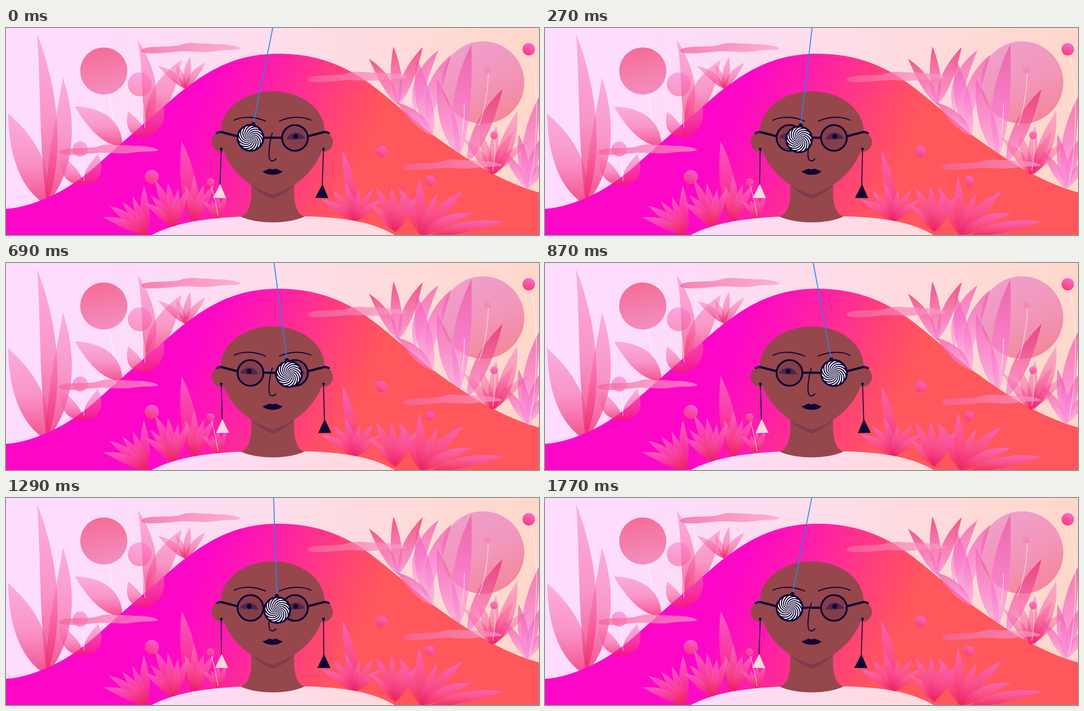
These frames come from a looping animation (1199 px wide and 467 px high, 1800 ms). An HTML page:

```html
<!DOCTYPE html>
<html lang="en">
<head>
<meta charset="utf-8">
<title>Pendulum</title>
<style>
html, body { margin: 0; width: 100%; height: 100%; overflow: hidden; }
svg { display: block; width: 100%; height: 100%; }
.line { fill: none; stroke: #100435; stroke-linecap: round; stroke-linejoin: round; }
.stem { fill: none; stroke: #fff; stroke-opacity: .6; stroke-width: 1.6; }
.ink { fill: #100435; }
.skin { fill: #95474c; }
</style>
</head>
<body>
<svg viewBox="0 0 1199 467" preserveAspectRatio="xMidYMid slice">
  <defs>
    <linearGradient id="sky" gradientUnits="userSpaceOnUse" x1="150" y1="180" x2="1150" y2="260">
      <stop offset="0" stop-color="#fddcff"/><stop offset=".5" stop-color="#fddde8"/><stop offset="1" stop-color="#ffd8cc"/>
    </linearGradient>
    <linearGradient id="hill" gradientUnits="userSpaceOnUse" x1="420" y1="190" x2="780" y2="345">
      <stop offset="0" stop-color="#fc06c8"/><stop offset=".35" stop-color="#fd20a6"/><stop offset=".75" stop-color="#ff4376"/><stop offset="1" stop-color="#ff575c"/>
    </linearGradient>
    <linearGradient id="shirt">
      <stop offset="0" stop-color="#fddcfb"/><stop offset="1" stop-color="#ffdbdc"/>
    </linearGradient>
    <linearGradient id="cloud">
      <stop offset="0" stop-color="#f4649a" stop-opacity=".75"/><stop offset="1" stop-color="#fc9ccb" stop-opacity=".7"/>
    </linearGradient>
    <linearGradient id="ball" x1=".7" y1="0" x2=".3" y2="1">
      <stop offset="0" stop-color="#fb6cd6"/><stop offset="1" stop-color="#f53c70"/>
    </linearGradient>
    <linearGradient id="sun" x1=".4" y1="0" x2=".6" y2="1">
      <stop offset="0" stop-color="#f66c96"/><stop offset="1" stop-color="#f28fc0"/>
    </linearGradient>
    <linearGradient id="moon" x1=".3" y1="0" x2=".75" y2="1">
      <stop offset="0" stop-color="#ee98cc"/><stop offset=".5" stop-color="#f090b8"/><stop offset="1" stop-color="#f27c92"/>
    </linearGradient>
    <linearGradient id="soft" x2="0" y2="1">
      <stop offset="0" stop-color="#f887c4" stop-opacity=".55"/><stop offset=".5" stop-color="#f65c9c" stop-opacity=".55"/><stop offset="1" stop-color="#f01c66" stop-opacity=".75"/>
    </linearGradient>
    <linearGradient id="warm" x2="0" y2="1">
      <stop offset="0" stop-color="#ea2c68" stop-opacity=".75"/><stop offset="1" stop-color="#fa80d4" stop-opacity=".65"/>
    </linearGradient>
    <linearGradient id="lilac" x2="0" y2="1">
      <stop offset="0" stop-color="#ec4c98" stop-opacity=".65"/><stop offset=".5" stop-color="#f872cc" stop-opacity=".7"/><stop offset="1" stop-color="#fa94dc" stop-opacity=".5"/>
    </linearGradient>
    <linearGradient id="front" x2="0" y2="1">
      <stop offset="0" stop-color="#fb6cc6" stop-opacity=".8"/><stop offset=".5" stop-color="#f84c98" stop-opacity=".7"/><stop offset="1" stop-color="#ea1c5a" stop-opacity=".7"/>
    </linearGradient>
    <path id="puff" d="M0 17C10 5 68 12 88 5 98 1 110 0 122 1 140 3 150 1 168 4 190 2 222 9 223 13 222 18 196 15 168 19 140 24 112 18 84 20 52 23 36 25 14 24 4 23 0 21 0 17Z"/>
  </defs>
  <rect width="1199" height="467" fill="url(#sky)"/>
  <circle cx="220" cy="97" r="53" fill="url(#sun)"/>
  <circle cx="1073" cy="123" r="93" fill="url(#moon)" opacity=".9"/>
  <g id="back"></g>
  <path fill="url(#hill)" d="M0 408C70 403 148 360 198 315 256 263 308 217 344 187 428 110 500 58 613 58 730 58 800 109 850 150 890 183 925 213 960 241 1040 299 1110 345 1199 371V467H0Z"/>
  <g id="mid"></g>
  <g id="fore"></g>
  <g fill="url(#cloud)">
    <use href="#puff" x="304" y="33"/><use href="#puff" x="119" y="262"/>
    <use href="#puff" x="678" y="98"/><use href="#puff" x="892" y="296"/>
  </g>
  <path fill="url(#shirt)" d="M328 467C390 434 480 424 600 424S810 428 874 467Z"/>
  <path class="skin" d="M552 340V372C552 400 543 423 527 425 565 443 635 443 672 425 657 423 648 400 648 372V340Z"/>
  <path fill="#7f3b4b" d="M551 354Q576 378 600 385 624 378 649 354L600 340Z"/>
  <g class="skin">
    <circle cx="485" cy="257" r="22.5"/><circle cx="713" cy="257" r="22.5"/>
    <path d="M483 232C485 180 538 143 600 143S715 180 717 232C720 290 677 352 600 376 523 352 480 290 483 232Z"/>
  </g>
  <g class="line" stroke-width="2.4">
    <path d="M513 208C534 198 561 200 584 210M615 210C638 200 665 198 686 208"/>
    <path d="M599 237C593 256 590 282 592.5 294 595 302 603 301 607 295"/>
  </g>
  <path class="ink" d="M577 323C586 322 589 317 595 317.5Q600 321 604 317.5C611 317 614 322 622 323 614 334 586 334 577 323Z"/>
  <g fill="#100435" fill-opacity=".13"><circle cx="550" cy="248" r="29"/><circle cx="650" cy="248" r="29"/></g>
  <path fill="#52244f" d="M526 248C538 232 558 231 568 251Q546 253 526 248ZM631 251C641 231 661 232 673 249Q652 253 631 251Z"/>
  <circle class="ink" cx="547" cy="244.5" r="5.7"/><circle class="ink" cx="652" cy="244.5" r="5.7"/>
  <g class="line" stroke-width="4">
    <circle cx="550" cy="248" r="29"/><circle cx="650" cy="248" r="29"/>
    <path stroke-width="5" d="M580 247.5H620M520 244L485 235Q479 234 474 237M680 244L715 235Q721 234 726 237"/>
  </g>
  <g id="earL"></g>
  <g id="earR"></g>
  <g id="bob">
    <path stroke="#2388f4" stroke-width="2" d="M0-20V230"/>
    <circle class="ink" cy="230" r="4.5"/>
    <g transform="translate(0 262)">
      <circle r="29.5" fill="#fff"/>
      <path id="swirl" class="ink"/>
      <circle class="line" r="29" stroke-width="4"/>
    </g>
  </g>
</svg>
<script>
const $ = id => document.getElementById(id);
const add = (id, markup) => $(id).insertAdjacentHTML('beforeend', markup);
const pt = (x, y) => x.toFixed(1) + ' ' + y.toFixed(1);

let seed = 7;
const random = () => (seed = seed * 16807 % 2147483647) / 2147483647;

// A leaf grows from its base to its tip; a positive bend bulges clockwise.
function leaf(layer, fill, bx, by, tx, ty, width, bend) {
  const dx = tx - bx, dy = ty - by, len = Math.hypot(dx, dy);
  const at = (k, off) => pt(bx + dx * k - dy / len * off, by + dy * k + dx / len * off);
  const w = width * .8;
  const d = `M${pt(bx, by)}C${at(.3, bend + w)} ${at(.7, bend + w * .6)} ${pt(tx, ty)}` +
    `C${at(.7, bend - w * .6)} ${at(.3, bend - w)} ${pt(bx, by)}Z`;
  add(layer, `<path fill="url(#${fill})" d="${d}"/>`);
}

// Leaves spread evenly between two angles from upright, with uneven lengths.
function fan(layer, fill, x, y, count, from, to, size) {
  for (let i = 0; i < count; i++) {
    const a = (from + (to - from) * i / (count - 1)) * Math.PI / 180;
    const len = size * (1 - .3 * random());
    leaf(layer, fill, x, y, x + len * Math.sin(a), y - len * Math.cos(a), 6 + len * .14, -len * .09 * Math.sin(a));
  }
}

const stem = (layer, d) => add(layer, `<path class="stem" d="${d}"/>`);
const ball = (layer, x, y, r, alpha = 1) =>
  add(layer, `<circle cx="${x}" cy="${y}" r="${r}" fill="url(#ball)" opacity="${alpha}"/>`);

// Left slope
stem('back', 'M231 150Q240 190 243 225');
leaf('back', 'soft', 92, 398, 70, 14, 38, 20);
leaf('back', 'soft', 88, 398, 5, 193, 62, 4);
leaf('back', 'soft', 92, 398, 128, 112, 46, 20);
leaf('back', 'soft', 262, 268, 155, 177, 50, 10);
leaf('back', 'soft', 312, 247, 296, 27, 32, 24);
leaf('back', 'soft', 318, 222, 395, 72, 46, -6);
leaf('mid', 'soft', 312, 247, 345, 150, 38, 12);
leaf('mid', 'soft', 312, 247, 275, 188, 30, -8);
stem('mid', 'M304 152Q312 185 312 225');
ball('mid', 301, 127, 27, .45);
leaf('mid', 'soft', 175, 355, 122, 283, 32, -10);
leaf('mid', 'soft', 175, 355, 207, 284, 34, 10);
stem('mid', 'M168 288Q176 315 175 345');
ball('mid', 167, 273, 17, .5);
fan('mid', 'soft', 403, 137, 4, -50, 38, 80);

// Right slope
fan('back', 'warm', 882, 174, 3, -32, 23, 158);
leaf('mid', 'lilac', 960, 243, 925, 72, 36, -5);
leaf('mid', 'lilac', 920, 190, 973, 50, 28, -16);
leaf('mid', 'lilac', 950, 210, 1002, 60, 32, -14);
leaf('mid', 'lilac', 960, 243, 880, 168, 26, 5);
leaf('back', 'lilac', 1020, 292, 1047, 37, 40, -10);
leaf('back', 'lilac', 1020, 292, 970, 115, 36, -3);
leaf('back', 'warm', 1038, 305, 1117, 138, 34, -5);
stem('back', 'M1085 102C1084 145 1075 195 1063 220');
ball('back', 1083, 94, 8, .2);
stem('back', 'M1031 170Q1032 200 1026 240');
fan('mid', 'soft', 1093, 331, 5, -38, 48, 135);
leaf('mid', 'soft', 1098, 331, 1150, 187, 32, 5);
stem('mid', 'M1099 250Q1102 285 1095 322');
ball('mid', 1098, 242, 9, .75);
leaf('mid', 'lilac', 1172, 364, 1201, 152, 32, -10);
fan('mid', 'lilac', 1172, 364, 4, -32, 38, 135);
stem('mid', 'M1181 62C1202 150 1193 290 1178 352');
ball('mid', 1176, 48, 14);

// Foreground
leaf('fore', 'front', 418, 437, 395, 255, 34, 4);
fan('fore', 'front', 426, 437, 4, -16, 27, 108);
fan('fore', 'front', 378, 450, 6, -50, 20, 120);
fan('fore', 'front', 314, 470, 5, -66, -2, 130);
fan('fore', 'front', 477, 430, 4, -41, 20, 58);
stem('fore', 'M462 357Q473 395 477 425');
ball('fore', 460, 348, 9, .8);
ball('fore', 328, 336, 16, .85);
leaf('fore', 'front', 785, 438, 757, 277, 26, 5);
fan('fore', 'front', 785, 438, 6, -56, 50, 100);
fan('fore', 'front', 876, 460, 5, -42, 32, 112);
fan('fore', 'front', 935, 470, 5, -25, 65, 140);
leaf('fore', 'front', 955, 470, 1120, 437, 24, -7);
ball('fore', 845, 279, 13, .85);
ball('fore', 954, 345, 11, .85);

const earring = fill => `<path class="line" stroke-width="2" d="M0 0V80"/><circle class="ink" r="3"/>` +
  `<path fill="${fill}" d="M.5 79L15 110.5H-14.5Z"/>`;
add('earL', earring('#fdd8dc'));
add('earR', earring('#100435'));

const ARMS = 14, REACH = 28, TWIST = 2.2;
function arm(i) {
  const step = 2 * Math.PI / ARMS, pts = [];
  const put = (r, a) => pts.push(pt(r * Math.cos(a), r * Math.sin(a)));
  const angle = r => i * step + TWIST * r / REACH;
  for (let r = 0; r <= REACH; r += 2) put(r, angle(r));
  for (let r = REACH; r >= 0; r -= 2) put(r, angle(r) + step / 2);
  return 'M' + pts.join('L') + 'Z';
}
$('swirl').setAttribute('d', Array.from({ length: ARMS }, (_, i) => arm(i)).join(''));

const LOOP = 1800, TICK = 30;
const pose = (id, x, y, deg) => $(id).setAttribute('transform', `translate(${x} ${y}) rotate(${deg})`);

function draw(ms) {
  const t = Math.floor(ms % LOOP / TICK) * TICK;
  const s = 1 - Math.abs(t / (LOOP / 2) - 1);
  const k = s * s * (3 - 2 * s);
  pose('bob', 601.8, -9, 11.4 - 22.05 * k);
  pose('swirl', 0, 0, 360 * t / LOOP);
  pose('earL', 484.3, 273, 2.1 - 4 * k);
  pose('earR', 714.3, 273, 2.1 - 4 * k);
}

const start = performance.now();
function frame() {
  draw(performance.now() - start);
  requestAnimationFrame(frame);
}
frame();
</script>
</body>
</html>
```
